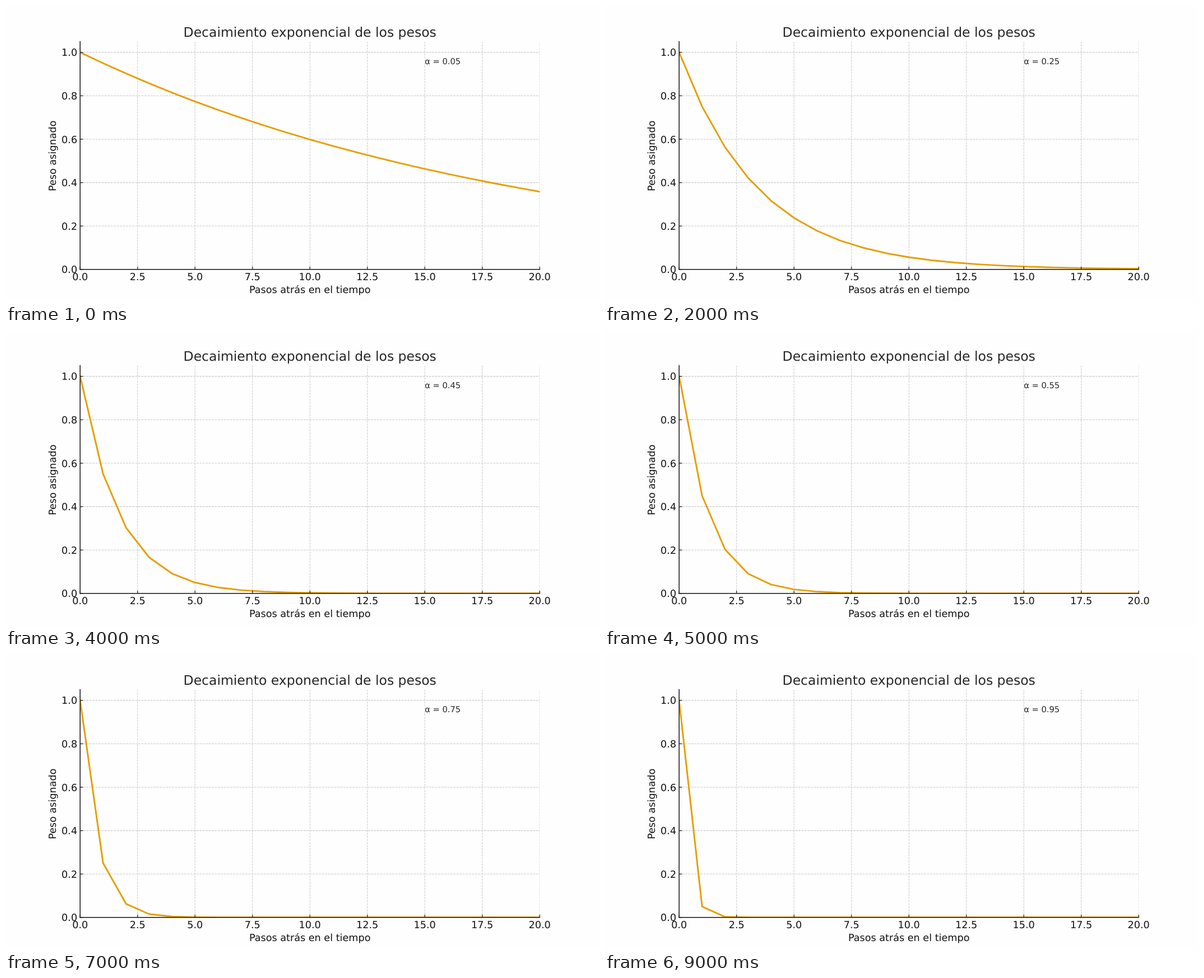
Animation of 1058 by 529 pixels, one loop 9.5 s. Source, as an HTML page:

```html
<!DOCTYPE html>
<html lang="es">
<head>
<meta charset="utf-8">
<title>Decaimiento exponencial</title>
<style>
  html, body { margin: 0; width: 100%; height: 100%; overflow: hidden; background: #fefefe; }
  svg { display: block; width: 100vw; height: 100vh; }
  text { font: 17.63px "DejaVu Sans", sans-serif; fill: #111; text-rendering: geometricPrecision; }
  .title { font-size: 23.51px; fill: #262626; }
  .note { font-size: 14.69px; fill: #262626; }
  .middle { text-anchor: middle; }
  .end { text-anchor: end; }
  .grid { stroke: #c8c8c8; stroke-width: 1.03; stroke-dasharray: 3.81 1.65; }
  .tick { stroke: #111; stroke-width: 1.18; }
  .spine { stroke: #111; stroke-width: 1.47; stroke-linecap: square; }
  .curve { fill: none; stroke: #e69f00; stroke-width: 2.94; stroke-linejoin: round; stroke-linecap: square; }
</style>
</head>
<body>
<svg viewBox="0 0 1058 529">
  <clipPath id="plot"><rect x="132.25" y="63.5" width="820" height="407.3"/></clipPath>
  <g id="grid" clip-path="url(#plot)"></g>
  <g clip-path="url(#plot)"><polyline id="curve" class="curve"/></g>
  <g id="axes"></g>
  <text class="title middle" x="542.2" y="55">Decaimiento exponencial de los pesos</text>
  <text class="middle" x="542.2" y="513.2">Pasos atrás en el tiempo</text>
  <text class="middle" transform="translate(89.3 267.9) rotate(-90)">Peso asignado</text>
  <text id="note" class="note" x="747.2" y="104.3"></text>
</svg>
<script>
  const LEFT = 132.25, RIGHT = 952.2, TOP = 63.48, BOTTOM = 470.81;
  const TICK = 5.14, STEP_MS = 500, STEPS = 19;
  const byId = id => document.getElementById(id);
  const xAt = v => LEFT + (RIGHT - LEFT) * v / 20;
  const yAt = v => BOTTOM - (BOTTOM - TOP) * v / 1.05;

  function add(parent, tag, attrs, text = "") {
    const node = document.createElementNS("http://www.w3.org/2000/svg", tag);
    for (const key in attrs) node.setAttribute(key, attrs[key]);
    node.textContent = text;
    byId(parent).append(node);
  }
  const line = (parent, style, x1, y1, x2, y2) =>
    add(parent, "line", { class: style, x1, y1, x2, y2 });

  for (let i = 0; i <= 8; i++) {
    const value = i * 2.5, x = xAt(value);
    line("grid", "grid", x, BOTTOM, x, TOP);
    line("axes", "tick", x, BOTTOM, x, BOTTOM - TICK);
    add("axes", "text", { class: "middle", x, y: 489.9 }, value.toFixed(1));
  }
  for (let i = 0; i <= 5; i++) {
    const value = i / 5, y = yAt(value);
    line("grid", "grid", LEFT, y, RIGHT, y);
    line("axes", "tick", LEFT, y, LEFT + TICK, y);
    add("axes", "text", { class: "end", x: 127.1, y: y + 6.6 }, value.toFixed(1));
  }
  line("axes", "spine", LEFT, BOTTOM, LEFT, TOP);
  line("axes", "spine", LEFT, BOTTOM, RIGHT, BOTTOM);

  let shown = -1;
  function show(step) {
    if (step === shown) return;
    shown = step;
    const alpha = (step + 1) * 0.05;
    const points = Array.from({ length: 21 }, (_, x) => [xAt(x), yAt((1 - alpha) ** x)]);
    byId("curve").setAttribute("points", points.join(" "));
    byId("note").textContent = `α = ${alpha.toFixed(2)}`;
  }

  const start = performance.now();
  function frame() {
    show(Math.floor((performance.now() - start) / STEP_MS) % STEPS);
    requestAnimationFrame(frame);
  }
  frame();
</script>
</body>
</html>
```
